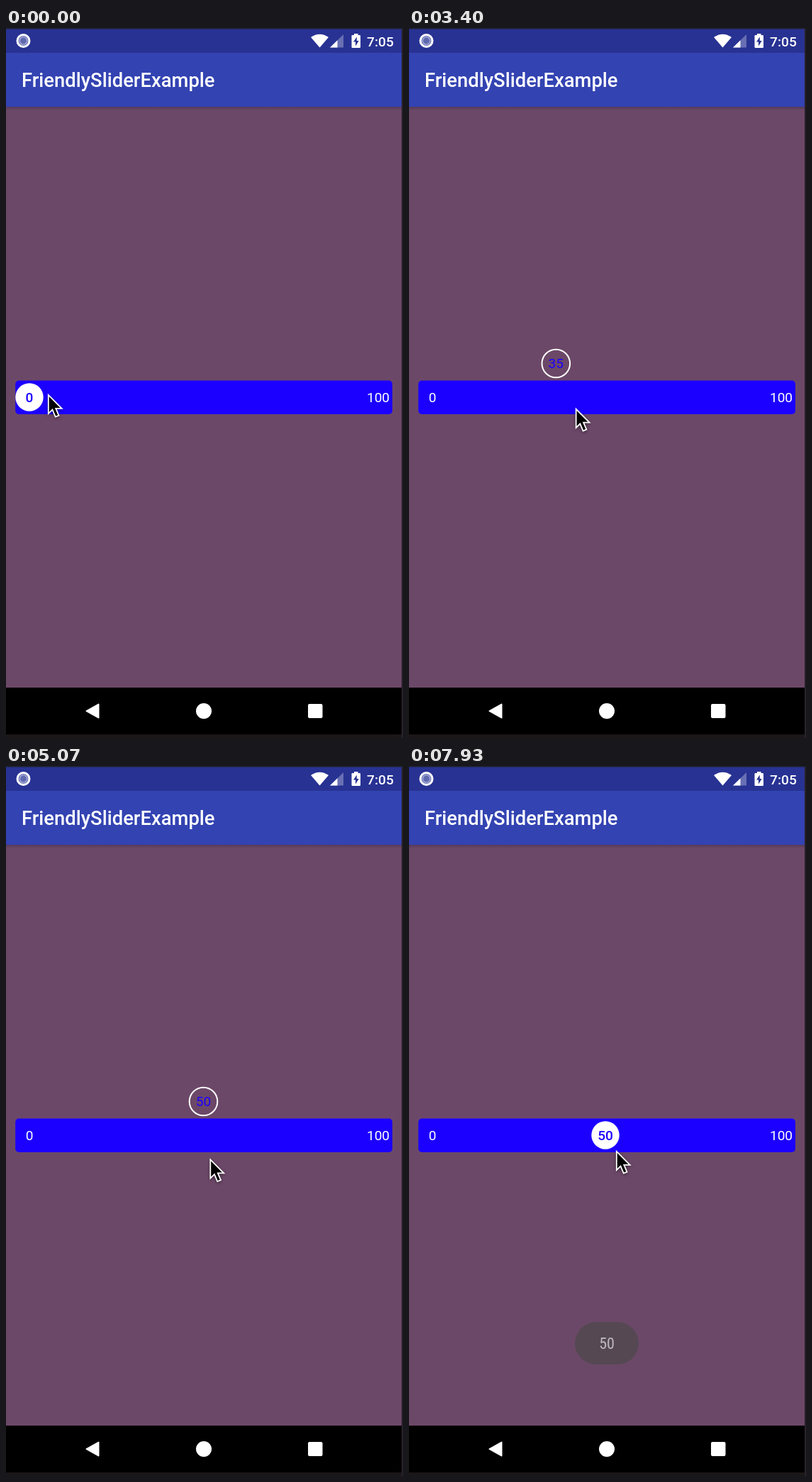
Write an HTML page with a canvas that moves like this. It is 560x1000 px and loops after 8000 ms.

```html
<!DOCTYPE html>
<html lang="en">
<head>
<meta charset="utf-8">
<title>Slider demo</title>
<style>
  html, body { margin: 0; width: 100%; height: 100%; overflow: hidden; background: #000; }
  canvas { display: block; width: 560px; height: 1000px; }
</style>
</head>
<body>
<canvas id="stage" width="560" height="1000"></canvas>
<script>
const ctx = document.getElementById('stage').getContext('2d');
const LOOP = 8000, STEP = 200 / 3;
const BLUE = '#1c00ff', WHITE = '#fff', STATUS = '#283293';
const MIN_X = 33, UNIT = 4.88, TRACK_Y = 520, RAISED_Y = 472.5;

const ramp = (t, start, length) => Math.min(1, Math.max(0, (t - start) / length));
const smooth = u => (1 - Math.cos(Math.PI * u)) / 2;
const cubic = u => u < 0.5 ? 4 * u ** 3 : 1 - 4 * (1 - u) ** 3;
const easeOut = power => u => 1 - (1 - u) ** power;

// Follows the moves one after another and returns the place at time t.
function follow(start, moves, eases, t) {
  return moves.reduce((place, { from, until, to }) => {
    const u = ramp(t, from, until - from);
    return place.map((v, i) => v + (to[i] - v) * eases[i](u));
  }, start);
}

// The hand swings sideways quickly and up or down more evenly.
const pointerEases = [easeOut(4.65), cubic];
const pointerMoves = [
  { from: 0, until: 333, to: [33, 533.5] },
  { from: 2700, until: 5133, to: [288, 553] },
  { from: 6000, until: 6440, to: [266, 809] },
  { from: 6567, until: 7133, to: [285, 531.5] },
  { from: 7267, until: 7533, to: [292.5, 541.5] }
];
const pointerAt = t => follow([59.5, 515.5], pointerMoves, pointerEases, t);

// The thumb trails the pointer and settles on a whole value when let go.
const thumbMoves = [
  { from: 2782, until: 4267, to: [266.5] },
  { from: 4267, until: 5133, to: [278.5] },
  { from: 5533, until: 5900, to: [MIN_X + 50 * UNIT] }
];
const thumbAt = t => follow([MIN_X], thumbMoves, [easeOut(2.55)], t)[0];

function rect(x, y, w, h, color, r = 0) {
  ctx.fillStyle = color;
  ctx.beginPath();
  ctx.roundRect(x, y, w, h, r);
  ctx.fill();
}

function disc(x, y, r, color) {
  ctx.fillStyle = color;
  ctx.beginPath();
  ctx.arc(x, y, r, 0, Math.PI * 2);
  ctx.fill();
}

function trace(points) {
  ctx.beginPath();
  points.forEach(([x, y]) => ctx.lineTo(x, y));
  ctx.closePath();
}

function shape(points, color) {
  trace(points);
  ctx.fillStyle = color;
  ctx.fill();
}

function label(text, x, y, size, color, { weight = 400, align = 'center', family = 'Roboto, sans-serif', stretch = '' } = {}) {
  ctx.font = `${weight} ${stretch} ${size}px ${family}`;
  ctx.textAlign = align;
  ctx.fillStyle = color;
  ctx.fillText(text, x, y + size * 0.355);
}

function drawStatusBar() {
  rect(0, 0, 560, 35, STATUS);
  disc(24.5, 18, 10, WHITE);
  disc(24.5, 18, 7, '#6a74b6');
  disc(24.5, 18, 6, '#a0a6d4');
  disc(24.5, 18, 4.4, '#5f69b0');

  ctx.fillStyle = WHITE;
  ctx.beginPath();
  ctx.moveTo(442.5, 27.5);
  ctx.lineTo(430, 13);
  ctx.quadraticCurveTo(442.5, 4.5, 455, 13);
  ctx.closePath();
  ctx.fill();

  shape([[457, 27.5], [476, 27.5], [476, 9]], 'rgba(255,255,255,.3)');
  shape([[457, 27.5], [467.5, 27.5], [467.5, 17.3]], WHITE);

  rect(487.5, 10, 12.5, 18, WHITE, 1.2);
  rect(491, 8, 5.5, 3, WHITE);
  shape([[494.8, 12.5], [490, 19.5], [493, 19.5], [493, 25.5], [497.7, 18], [494.8, 18]], STATUS);
  label('7:05', 528, 18.7, 19.2, WHITE, { weight: 500 });
}

function drawFrame() {
  rect(0, 0, 560, 1000, '#6c4868');
  const shade = ctx.createLinearGradient(0, 111, 0, 116);
  shade.addColorStop(0, 'rgba(30,20,40,.28)');
  shade.addColorStop(1, 'rgba(30,20,40,0)');
  rect(0, 111, 560, 5, shade);
  rect(0, 35, 560, 76, '#3343b2');
  drawStatusBar();
  label('FriendlySliderExample', 22, 73.5, 27.4, WHITE, { weight: 500, align: 'left' });

  rect(0, 929, 560, 66, '#000');
  ctx.strokeStyle = WHITE;
  ctx.lineWidth = 2;
  ctx.lineJoin = 'round';
  shape([[113.5, 962], [130.5, 952.5], [130.5, 971.5]], WHITE);
  ctx.stroke();
  disc(279, 962, 11, WHITE);
  rect(426, 952, 20.5, 20, WHITE, 2);

  rect(0, 995, 560, 5, '#1b1718');
  rect(558, 0, 2, 1000, '#29222b');
  rect(0, 0, 560, 1.6, '#20222f');
}

function drawSlider(t) {
  rect(13.2, 496.5, 531.8, 47.4, BLUE, 5);
  label('0', MIN_X, TRACK_Y, 19.1, WHITE);
  label('100', 525, TRACK_Y, 19.1, WHITE);

  const lift = smooth(ramp(t, 1950, 360)) - smooth(ramp(t, 5550, 360));
  const x = thumbAt(t);
  const y = TRACK_Y + (RAISED_Y - TRACK_Y) * lift;
  const value = Math.floor((x - MIN_X) / UNIT + 1e-6);
  disc(x, y, 19.7, `rgba(255,255,255,${1 - lift})`);
  if (lift > 0) {
    ctx.strokeStyle = WHITE;
    ctx.lineWidth = 2;
    ctx.beginPath();
    ctx.arc(x, y, 18.7 + 1.1 * lift, 0, Math.PI * 2);
    ctx.stroke();
  }
  label(value, x, y, 19.1, BLUE, { weight: lift < 0.5 ? 500 : 400 });
}

function drawToast(t) {
  const alpha = easeOut(2)(ramp(t, 5650, 400)) - ramp(t, 7700, 400) ** 2;
  ctx.globalAlpha = alpha;
  rect(234, 783, 90, 60, '#4a4a4a', 30);
  label('50', 279, 813.3, 22, '#f4f4f4', { family: '"Roboto Condensed", Roboto, sans-serif', stretch: 'condensed' });
  ctx.globalAlpha = 1;
}

function drawPointer(t) {
  const [x, y] = pointerAt(t);
  const arrow = [[1.2, 3.6], [1.2, 25.5], [6.3, 20.5], [10.7, 31], [13.8, 29.7], [9.4, 19.4], [17, 19.4]];
  ctx.save();
  ctx.translate(x, y);
  ctx.lineJoin = 'miter';
  ctx.lineWidth = 3.6;
  ctx.strokeStyle = WHITE;
  ctx.shadowColor = 'rgba(0,0,0,.45)';
  ctx.shadowBlur = 4;
  ctx.shadowOffsetY = 1.5;
  trace(arrow);
  ctx.stroke();
  ctx.shadowColor = 'transparent';
  shape(arrow, '#000');
  ctx.restore();
}

function draw(t) {
  drawFrame();
  drawSlider(t);
  drawToast(t);
  drawPointer(t);
}

// The picture advances 15 times a second.
let start;
function tick(now) {
  start ??= now;
  const t = (now - start) % LOOP;
  draw(Math.floor((t + 5) / STEP) * STEP);
  requestAnimationFrame(tick);
}
draw(0);
requestAnimationFrame(tick);
</script>
</body>
</html>
```
